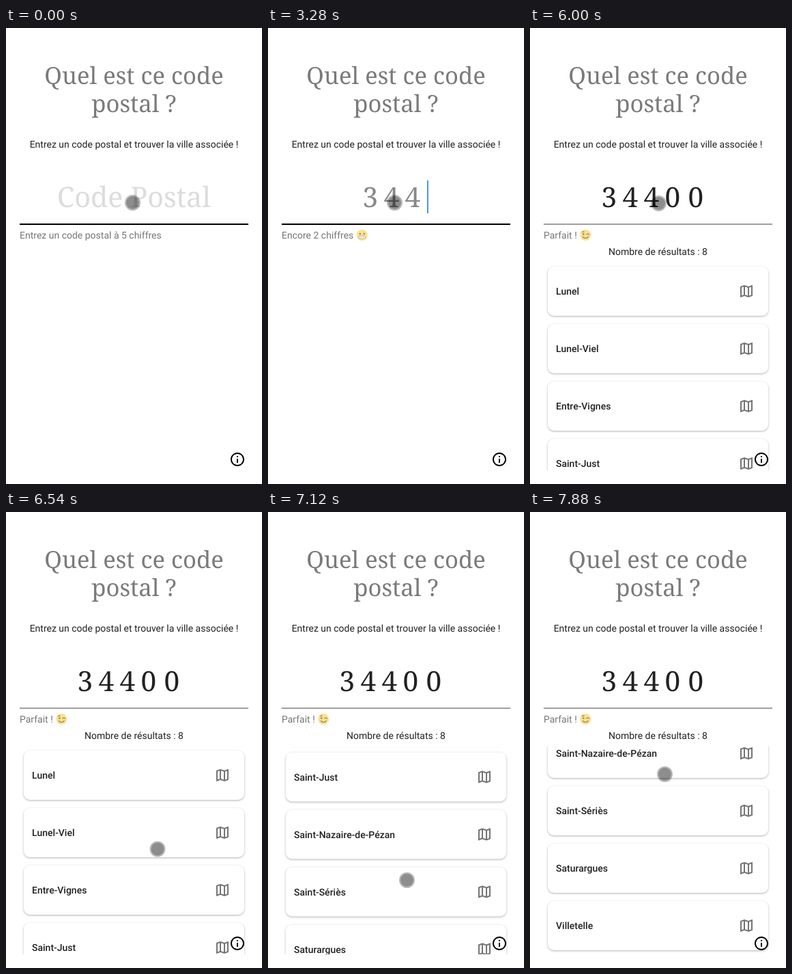
Animation, 375 px wide and 667 px high, one loop 8000 ms. Source, as an HTML page:

```html
<!DOCTYPE html>
<html lang="fr">
<head>
<meta charset="utf-8">
<title>Code postal</title>
<style>
html, body { margin: 0; height: 100%; overflow: hidden; background: #fff; }
svg { display: block; width: 100vw; height: 100vh; font: 14px Roboto, sans-serif; fill: #212121; text-rendering: geometricPrecision; }
.serif { font-family: "Noto Serif", serif; }
.mid { text-anchor: middle; }
.title { font-size: 34.6px; fill: #7a7a7a; }
.hint { font-size: 41.3px; fill: #dcdcdc; }
.digits { font-size: 40.5px; }
.help { fill: #757575; }
.name { font-weight: 500; }
.card { fill: #fff; filter: drop-shadow(0 1px 1.5px rgba(0, 0, 0, .3)); }
.face { opacity: .65; }
</style>
</head>
<body>
<svg viewBox="0 0 375 667">
  <defs>
    <clipPath id="viewport"><rect x="20" y="343" width="335" height="304"/></clipPath>
    <path id="map" fill="#757575" d="M20.5 3l-.16.03L15 5.1 9 3 3.36 4.9c-.21.07-.36.25-.36.48V20.5c0 .28.22.5.5.5l.16-.03L9 18.9l6 2.1 5.64-1.9c.21-.07.36-.25.36-.48V3.5c0-.28-.22-.5-.5-.5zM10 5.47l4 1.4v11.66l-4-1.4V5.47zm-5 .99l3-1.01v11.7l-3 1.16V6.46zm14 11.08l-3 1.01V6.86l3-1.16v11.84z"/>
  </defs>

  <g class="serif mid title">
    <text x="187.5" y="82">Quel est ce code</text>
    <text x="187.5" y="123">postal ?</text>
  </g>
  <text class="mid" x="187.5" y="175">Entrez un code postal et trouver la ville associée !</text>

  <text id="hint" class="serif mid hint" x="187.5" y="261.5">Code Postal</text>
  <text id="digits" class="serif digits" y="262"></text>
  <rect id="cursor" width="2" fill="#4a98e6"/>
  <rect id="line" x="20" y="286" width="335" height="2"/>

  <text id="help" class="help" x="20" y="308"></text>
  <g id="emoji" class="face">
    <circle r="8" fill="#fcd24f"/>
    <g id="grimace">
      <circle cx="-3" cy="-2" r="1.2" fill="#5b4020"/>
      <circle cx="3" cy="-2" r="1.2" fill="#5b4020"/>
      <rect x="-5" y="1.2" width="10" height="4" rx="2" fill="#fff" stroke="#8a6a35" stroke-width=".7"/>
      <path d="M-5 3.2H5M-2 1.2v4M2 1.2v4" stroke="#b9a27c" stroke-width=".5"/>
    </g>
    <g id="wink" fill="none" stroke="#5b4020" stroke-width="1.1" stroke-linecap="round">
      <circle cx="-3" cy="-1.5" r=".8" fill="#5b4020"/>
      <path d="M1.5 -1.2q2 -1.6 4 .3M-4 2.5q4 4 8 0M-5 -4.5q1.5 -1 3 -.5"/>
    </g>
  </g>

  <g id="results">
    <text class="mid" x="187.5" y="332">Nombre de résultats : 8</text>
    <g clip-path="url(#viewport)"><g id="list"></g></g>
  </g>

  <path fill="#000" transform="translate(327 619)" d="M11 7h2v2h-2zm0 4h2v6h-2zm1-9C6.48 2 2 6.48 2 12s4.48 10 10 10 10-4.48 10-10S17.52 2 12 2zm0 18c-4.41 0-8-3.59-8-8s3.59-8 8-8 8 3.59 8 8-3.59 8-8 8z"/>

  <g id="pointer">
    <circle r="11.5" fill-opacity=".27"/>
    <circle id="core" r="9.5"/>
  </g>
</svg>
<script>
const LOOP = 8000, DRAG_START = 6000, TICK = 110.4;
const $ = id => document.getElementById(id);
const set = (id, attrs) => {
  for (const name in attrs) $(id).setAttribute(name, attrs[name]);
};
const show = (id, visible) => set(id, { visibility: visible ? 'visible' : 'hidden' });

const towns = ['Lunel', 'Lunel-Viel', 'Entre-Vignes', 'Saint-Just',
  'Saint-Nazaire-de-Pézan', 'Saint-Sériès', 'Saturargues', 'Villetelle'];
$('list').innerHTML = towns.map((town, i) => `
  <g transform="translate(0 ${349 + 84 * i})">
    <rect class="card" x="26" width="323" height="72" rx="9"/>
    <text class="name" x="38" y="41">${town}</text>
    <use href="#map" x="305" y="24"/>
  </g>`).join('');

const CODE = '34400';
const typedAt = [1750, 2400, 3280, 3930, 4460];
const helpTexts = ['Entrez un code postal à 5 chiffres', 'Encore 4 chiffres',
  'Encore 3 chiffres', 'Encore 2 chiffres', "Plus qu'un chiffre", 'Parfait !'];
// Intervals during which the caret is lit
const caretOn = [[100, 670], [1200, 1650], [1750, 2180], [2400, 2850], [3280, 3830], [3930, 4360]];

// Keys of the gesture, counted in ticks
const pointerPath = [[-1, 185.5, 255.5], [0, 188.5, 256.5], [2, 207, 390], [4, 222, 493],
  [5, 222, 493], [7, 219.5, 329], [8, 218, 280], [10, 203.5, 538.5], [13, 218, 276],
  [14, 219, 237], [17, 197.5, 383.5]];
const scrollPath = [[5, 0], [7, 154], [8, 205], [10, 249.5], [11, 256], [13, 368]];

function along(path, k) {
  const next = path.findIndex(key => key[0] > k);
  if (next === 0) return path[0].slice(1);
  if (next < 0) return path[path.length - 1].slice(1);
  const a = path[next - 1], b = path[next];
  const p = (k - a[0]) / (b[0] - a[0]);
  return a.slice(1).map((v, i) => v + (b[i + 1] - v) * p);
}

function drawField(t) {
  const count = typedAt.filter(at => t >= at).length;
  const done = count === CODE.length;
  const typed = [...CODE.slice(0, count)];
  const advances = typed.map(d => d === '0' ? 34 : 31);
  const width = advances.reduce((sum, a) => sum + a, 0);
  let x = 185 - width / 2;
  const xs = advances.map(a => (x += a) - a);

  $('digits').textContent = typed.join('');
  set('digits', { x: xs.join(' '), fill: done ? '#212121' : '#888' });
  set('hint', { opacity: t < 1750 ? 1 : t < 1870 ? 0.4 : 0 });
  set('line', { fill: done ? '#a0a0a0' : '#000' });

  const inset = count ? 0 : 3;
  set('cursor', {
    x: 186.5 + width / 2, y: 223 + inset, height: 48 - 2 * inset,
    opacity: t >= 550 && t < 670 ? 0.5 : 1
  });
  show('cursor', caretOn.some(([from, to]) => t >= from && t < to));

  $('help').textContent = helpTexts[count];
  const end = 20 + $('help').getComputedTextLength();
  set('emoji', { transform: `translate(${end + 12.5} 303)`, display: count ? 'inline' : 'none' });
  show('grimace', !done);
  show('wink', done);
  show('results', t >= 4580);
}

function drawGesture(t) {
  const k = Math.max(-1, Math.floor((t - DRAG_START) / TICK));
  const [x, y] = along(pointerPath, k);
  const [scroll] = along(scrollPath, k);
  const pressed = k >= 6 && k <= 8 || k >= 11 && k <= 13;
  set('list', { transform: `translate(0 ${-scroll})` });
  set('pointer', { transform: `translate(${x} ${y})`, fill: pressed ? '#b8b400' : '#000' });
  set('core', { 'fill-opacity': pressed ? 0.72 : 0.24 });
}

const start = performance.now();
function frame(now) {
  const t = Math.max(0, now - start) % LOOP;
  drawField(t);
  drawGesture(t);
  requestAnimationFrame(frame);
}
frame(start);
</script>
</body>
</html>
```
